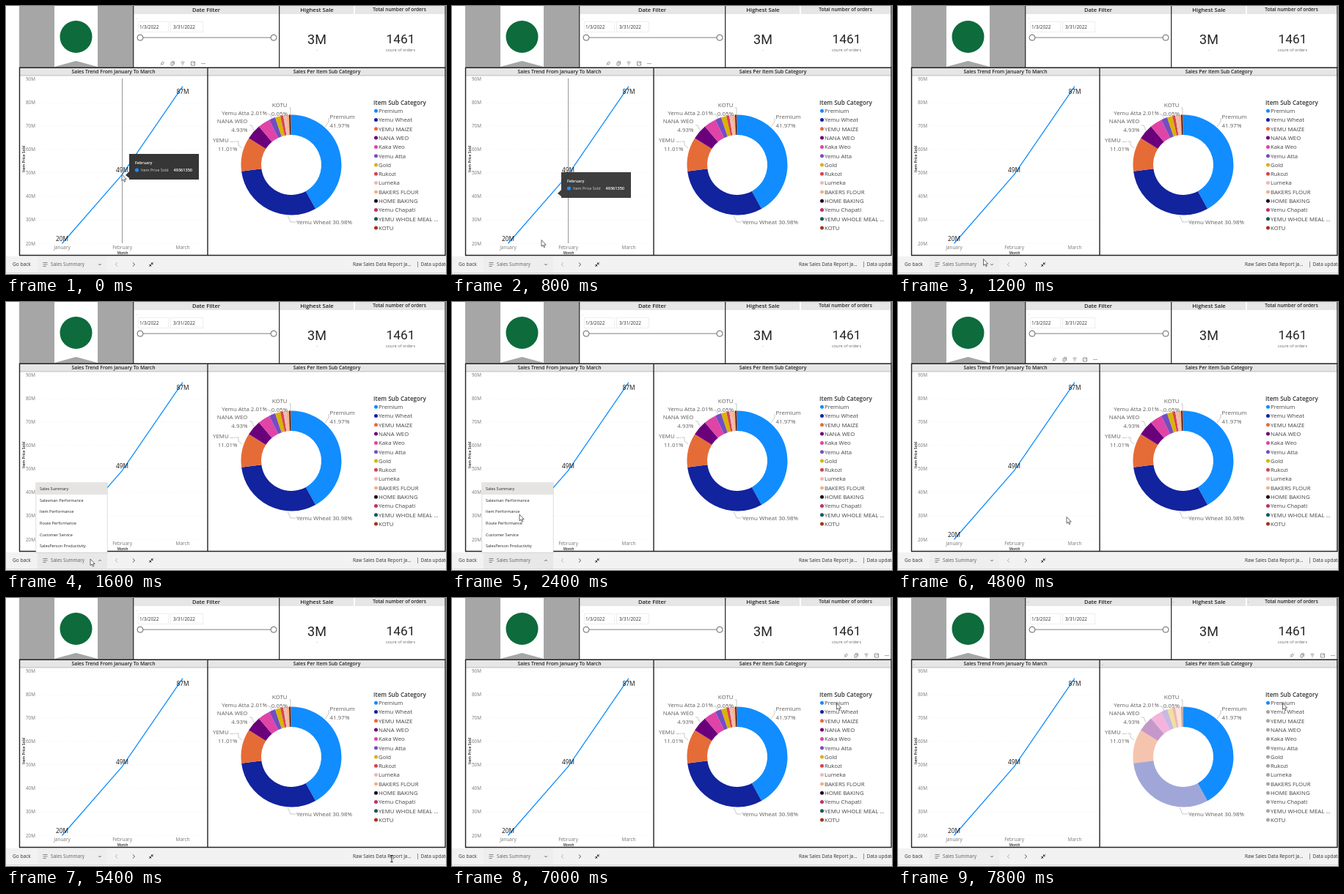
An HTML page that plays this animation: 600 px wide and 366 px high, repeating every 8000 ms.

```html
<!DOCTYPE html>
<html lang="en">
<head>
<meta charset="utf-8">
<title>Sales dashboard</title>
<style>
html, body { margin: 0; width: 100%; height: 100%; overflow: hidden; background: #fff; }
svg { display: block; width: 100vw; height: 100vh; font-family: "Open Sans", "Noto Sans", sans-serif; }
</style>
</head>
<body>
<svg id="stage" viewBox="0 0 600 366"></svg>
<script>
const LOOP = 8000, STEP = 200;
const stage = document.getElementById('stage');

function add(parent, tag, attrs, content) {
  const node = document.createElementNS('http://www.w3.org/2000/svg', tag);
  for (const key in attrs) node.setAttribute(key, attrs[key]);
  if (content !== undefined) node.textContent = content;
  parent.appendChild(node);
  return node;
}
const group = (parent = stage) => add(parent, 'g', {});
const rect = (p, x, y, width, height, fill, more) => add(p, 'rect', { x, y, width, height, fill, ...more });
const path = (p, d, stroke, width = 1, fill = 'none') =>
  add(p, 'path', { d, stroke, 'stroke-width': width, fill });
const dot = (p, cx, cy, r, fill, more) => add(p, 'circle', { cx, cy, r, fill, ...more });
const text = (p, x, y, size, str, fill = '#333', more) =>
  add(p, 'text', { x, y, 'font-size': size, fill, ...more }, str);
const bold = { 'font-weight': 600 };
const middle = { 'text-anchor': 'middle' };
const right = { 'text-anchor': 'end' };
const title = (x, y, size, str) => text(stage, x, y, size, str, '#222', { ...bold, ...middle });
const show = (node, on) => node.setAttribute('visibility', on ? 'visible' : 'hidden');

function drawTop() {
  rect(stage, 18, 0, 155, 84, '#a6a6a6');
  path(stage, 'M66 0H125V83L95.5 75L66 83Z', 'none', 0, '#fff');
  dot(stage, 95.5, 42, 22, '#0d6b3c');

  rect(stage, 174, 0, 198, 11, '#e6e6e6');
  rect(stage, 373, 0, 101, 11, '#e6e6e6');
  rect(stage, 476, 0, 123, 11, '#e6e6e6');
  path(stage, 'M173.7 0V84M372.7 0V84M599 0V84', '#222', 1.2);
  path(stage, 'M474.5 0V11', '#fff', 1);
  title(273, 7.5, 7.6, 'Date Filter');
  title(424, 8.3, 7.7, 'Highest Sale');
  title(536.5, 7.2, 6.55, 'Total number of orders');

  rect(stage, 180.5, 21.5, 41, 14, '#fff', { stroke: '#efefef' });
  rect(stage, 224.5, 21.5, 44, 14, '#fff', { stroke: '#efefef' });
  text(stage, 182, 31, 6.3, '1/3/2022');
  text(stage, 228, 31, 6.3, '3/31/2022');
  text(stage, 178, 18, 5, '.', '#777');
  path(stage, 'M183 43.2H365', '#999', 1.3);
  for (const x of [183, 365]) dot(stage, x, 43.2, 4, '#fff', { stroke: '#666' });

  const number = { ...middle, 'font-family': 'Roboto, sans-serif' };
  text(stage, 424, 52, 18, '3M', '#252423', number);
  text(stage, 538, 51, 17.4, '1461', '#252423', number);
  text(stage, 424, 62, 5, '-', '#777', middle);
  text(stage, 538, 62, 5.6, 'count of orders', '#666', middle);
}

function drawFrames() {
  rect(stage, 19, 85, 255, 10, '#e6e6e6');
  rect(stage, 276, 85, 323, 10, '#e6e6e6');
  path(stage, 'M18 95H599', '#999', 0.6);
  path(stage, 'M18 84.2H599V340.5H18.5V84M275 84V340', '#222', 1.4);
  title(146.5, 92.1, 6.75, 'Sales Trend From January To March');
  title(437.5, 92.1, 6.8, 'Sales Per Item Sub Category');
}

const valueY = millions => 324.2 - (millions - 20) * 3.203;

function drawLineChart() {
  for (let m = 20; m <= 90; m += 10) {
    const y = valueY(m);
    add(stage, 'path', { d: `M45 ${y}H272`, stroke: '#ececec', 'stroke-width': 0.7, 'stroke-dasharray': '1 2' });
    text(stage, 40, y + 2.3, 6.4, m + 'M', '#777', right);
  }
  const months = [['January', 76.5, 20], ['February', 158.5, 49.36], ['March', 241, 87]];
  const hoverLine = path(stage, 'M158.5 99V324', '#999', 1);
  path(stage, 'M' + months.map(([, x, v]) => `${x} ${valueY(v)}`).join('L'), '#118dff', 1.3);
  months.forEach(([name, x, v], i) => {
    text(stage, x, 331.5, 6.4, name, '#777', middle);
    text(stage, x, [321, 227.3, 120][i], 8.3, Math.floor(v) + 'M', '#111', middle);
  });
  text(stage, 159, 338.5, 4.6, 'Month', '#222', { ...bold, ...middle });
  text(stage, 0, 0, 5, 'Item Price Sold', '#222', { ...bold, ...middle, transform: 'translate(25.5 209) rotate(-90)' });
  return hoverLine;
}

// name, share in percent, colour
const items = [
  ['Premium', 41.97, '#118dff'], ['Yemu Wheat', 30.98, '#12239e'], ['YEMU MAIZE', 11.01, '#e66c37'],
  ['NANA WEO', 4.93, '#6b007b'], ['Kaka Weo', 3.9, '#e044a7'], ['Yemu Atta', 2.01, '#744ec2'],
  ['Gold', 1.7, '#d9b300'], ['Rukozi', 0.95, '#d64550'], ['Lumeka', 1, '#f1b9b2'],
  ['BAKERS FLOUR', 0.86, '#f3b184'], ['HOME BAKING', 0.39, '#1a0a1e'], ['Yemu Chapati', 0.15, '#c0305f'],
  ['YEMU WHOLE MEAL ...', 0.1, '#0f5a55'], ['KOTU', 0.05, '#a0361c']
];

function ringSlice(from, to) {
  const at = (share, r) => {
    const a = share / 100 * 2 * Math.PI;
    return `${(389 + r * Math.sin(a)).toFixed(2)} ${(217 - r * Math.cos(a)).toFixed(2)}`;
  };
  const large = to - from > 50 ? 1 : 0;
  return `M${at(from, 68.5)}A68.5 68.5 0 ${large} 1 ${at(to, 68.5)}L${at(to, 41)}A41 41 0 ${large} 0 ${at(from, 41)}Z`;
}

function drawDonut() {
  let start = 0;
  text(stage, 501, 134.8, 8.1, 'Item Sub Category', '#333', bold);
  const parts = items.map(([name, share, color], i) => {
    const slice = path(stage, ringSlice(start, start + share), 'none', 0, color);
    start += share;
    const y = 143.2 + i * 12.3;
    const mark = dot(stage, 504.5, y, 2.5, color);
    text(stage, 508, y + 2.8, 7.8, name, '#444');
    return { slice, mark, color };
  });
  path(stage, 'M435 165L440 158V153M384 286L388 295H395M313 185H317V190L322 194' +
    'M332 163H335L338 170M357 148H360L363 154M386 139H388V148', '#b0b0b0', 0.7);
  const leftLabels = [['Premium', 441.5, 154.4], ['41.97%', 441.5, 166.4], ['Yemu Wheat 30.98%', 396, 298]];
  const rightLabels = [
    ['YEMU ...', 312, 186], ['11.01%', 315.5, 198], ['NANA WEO', 329.5, 160], ['4.93%', 329.5, 171.6],
    ['Yemu Atta 2.01%', 356, 149], ['KOTU', 383.5, 138], ['0.05%', 384, 149.5]
  ];
  for (const [label, x, y] of leftLabels) text(stage, x, y, 8, label, '#605e5c');
  for (const [label, x, y] of rightLabels) text(stage, x, y, 7.9, label, '#605e5c', right);
  return parts;
}

function drawToolbar(x) {
  const g = group();
  g.setAttribute('transform', `translate(${x} 78.6)`);
  path(g, 'M-2.5 2.5L-.5 .5M-2 -1L1 2M-1.2 -.5L1 -2.5L2.5 -1L.5 1.2' +
    'M12 -1.5H15V2.5H12ZM13 -2.8H16.5V1.2M25.5 -2H30.5M26.5 0H29.5M27.3 2H28.7' +
    'M39.5 -2.5H44.5V2.5H39.5ZM41.5 .5L44 -2', '#666', 0.7);
  for (const dx of [-2, 0, 2]) dot(g, 56 + dx, 0, 0.6, '#555');
  return g;
}

function drawBar() {
  rect(stage, 0, 342, 600, 22.5, '#f3f2f3');
  path(stage, 'M0 364.5H600', '#d2d0ce', 0.8);
  const button = rect(stage, 43, 342, 95, 22);
  text(stage, 9, 355.3, 6.6, 'Go back');
  path(stage, 'M50.5 350.5H56.5M50.5 353H56.5M50.5 355.5H54.5', '#555', 0.7);
  text(stage, 61, 355.3, 6.45, 'Sales Summary', '#605e5c');
  const chevron = path(stage, '', '#555', 0.8);
  path(stage, 'M151.8 350.3L149.3 353L151.8 355.7', '#aaa', 0.9);
  path(stage, 'M173 350.3L175.5 353L173 355.7', '#444', 0.9);
  path(stage, 'M195 356L197.5 353.5M195.3 353.5H197.5V355.7M201 350L198.5 352.5M198.5 350.3V352.5H200.7', '#333', 0.9);
  text(stage, 473, 355.3, 6.45, 'Raw Sales Data Report Ja...');
  path(stage, 'M561.5 349V357', '#777', 0.8);
  text(stage, 565.5, 355.3, 6.5, 'Data updated');
  return { button, chevron };
}

function drawMenu() {
  const g = group();
  rect(g, 40, 247, 99, 96, '#000', { opacity: 0.08 });
  rect(g, 41, 246.5, 97, 95.5, '#fff', { stroke: '#dcdcdc', 'stroke-width': 0.6 });
  rect(g, 41, 247, 97, 16, '#e6e4e2');
  ['Sales Summary', 'Salesman Performance', 'Item Performance', 'Route Performance',
    'Customer Service', 'SalesPerson Productivity']
    .forEach((name, i) => text(g, 46, 257 + i * 15.65, 5.5, name, '#252423'));
  return g;
}

function drawTooltip() {
  const g = group();
  rect(g, 0, 0, 95, 35, '#333');
  path(g, 'M0 24L-5 29L0 33Z', 'none', 0, '#333');
  text(g, 8, 13.5, 5.4, 'February', '#fff', bold);
  dot(g, 10.5, 22, 2.6, '#118dff');
  text(g, 16, 24, 5.4, 'Item Price Sold', '#d0d0d0');
  text(g, 60.5, 24, 5.6, '49361350', '#fff', bold);
  return g;
}

drawTop();
drawFrames();
const hoverLine = drawLineChart();
const slices = drawDonut();
const lineTools = drawToolbar(213);
const donutTools = drawToolbar(537);
const bar = drawBar();
const menu = drawMenu();
const tooltip = drawTooltip();
const focusDots = group();
for (const [x, y] of [[177, 6], [375, 6], [477, 6], [21, 92], [278, 92]]) text(focusDots, x, y, 6, '.', '#333');
const arrow = path(stage, 'M0 0V8.8L2 7L3.4 10.2L4.8 9.6L3.5 6.6H6.2Z', '#444', 0.8, '#fff');
const beam = path(stage, 'M-1.8 -4.5H1.8M0 -4.5V4.5M-1.8 4.5H1.8', '#222', 0.9);

// time, x, y
const pointerKeys = [
  [0, 158, 230], [200, 157, 232], [400, 150, 242], [600, 139, 262], [800, 122, 319.5], [1000, 118, 340],
  [1400, 115, 351], [1600, 115, 351], [2000, 105, 320], [2400, 92, 290], [2600, 92, 290],
  [2800, 87, 256], [3200, 86, 252], [3600, 85, 250], [4400, 85, 250], [4600, 120, 262],
  [5000, 340, 325], [5200, 460, 350], [5400, 526, 356], [5600, 528, 338], [6800, 525, 146], [7000, 524.5, 143.5]
];
const tooltipKeys = [[0, 168, 202], [200, 167, 204], [400, 160, 214], [600, 149, 227]];

function sample(keys, t) {
  const next = keys.findIndex(k => k[0] > t);
  if (next < 0) return keys[keys.length - 1].slice(1);
  const [t0, x0, y0] = keys[next - 1], [t1, x1, y1] = keys[next];
  const f = (t - t0) / (t1 - t0);
  return [x0 + (x1 - x0) * f, y0 + (y1 - y0) * f];
}
const place = (node, keys, t) => node.setAttribute('transform', `translate(${sample(keys, t)})`);

function render(ms) {
  const t = Math.floor(ms % LOOP / STEP) * STEP;
  const between = (from, to) => t >= from && t < to;
  const menuOpen = between(1400, 3600);
  const dim = t < 7600 ? 0 : t < 7800 ? 0.5 : 1;

  place(arrow, pointerKeys, t);
  place(beam, pointerKeys, t);
  show(beam, t === 5400);
  show(arrow, t !== 5400);

  place(tooltip, tooltipKeys, t);
  tooltip.setAttribute('opacity', t < 800 ? 0.98 : 0.94);
  show(tooltip, t < 1000);
  show(hoverLine, t < 1000);

  show(menu, menuOpen);
  bar.button.setAttribute('fill', menuOpen ? '#e9e8e8' : '#efeeee');
  bar.chevron.setAttribute('d', menuOpen ? 'M126 354L128 352L130 354' : 'M126 352L128 354L130 352');

  show(lineTools, t < 1000 || between(3600, 5000));
  show(donutTools, between(5000, 5200) || t >= 5600);
  show(focusDots, dim > 0);
  slices.slice(1).forEach(({ slice, mark, color }) => {
    slice.setAttribute('opacity', 1 - 0.6 * dim);
    mark.setAttribute('fill', dim ? '#a6a6a6' : color);
  });
}

const begin = performance.now();
function tick() {
  render(performance.now() - begin);
  requestAnimationFrame(tick);
}
tick();
</script>
</body>
</html>
```
